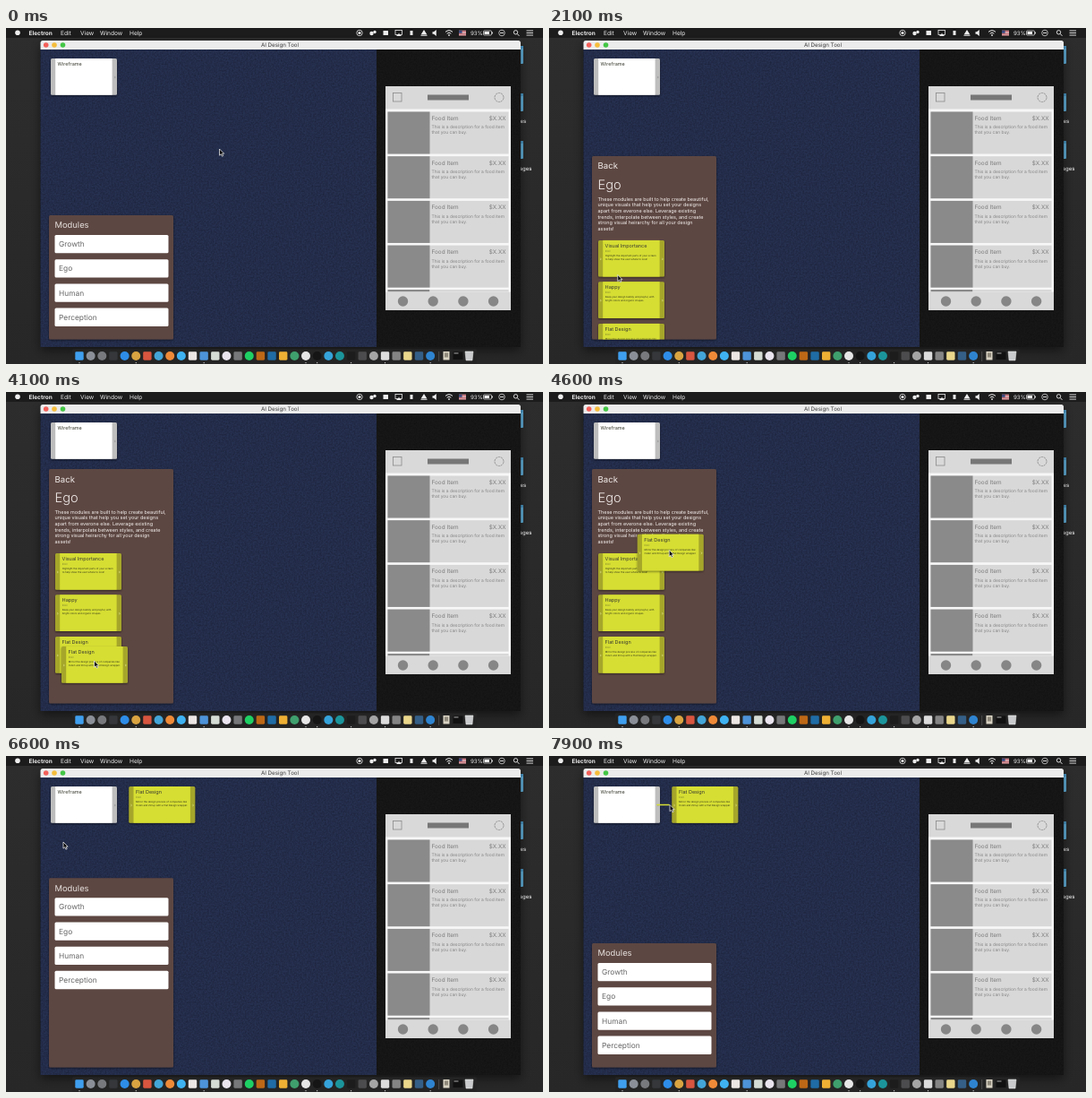
These frames come from a looping animation (600 by 375 pixels, 8 s). An HTML page:

```html
<!DOCTYPE html>
<html lang="en">
<head>
<meta charset="utf-8">
<title>AI Design Tool</title>
<style>
html, body { margin: 0; width: 100%; height: 100%; overflow: hidden; background: #2b2b2b; }
svg { display: block; width: 100vw; height: 100vh; }
text { font-family: Inter, Roboto, sans-serif; white-space: pre; text-rendering: geometricPrecision; }
</style>
</head>
<body>
<svg id="stage" viewBox="0 0 600 375"></svg>
<script>
const LOOP = 8000, STEP = 100, BOTTOM = 347.5;
const stage = document.getElementById('stage');

// Markup helpers
const rect = (x, y, w, h, fill, more = '') =>
  `<rect x="${x}" y="${y}" width="${w}" height="${h}" fill="${fill}" ${more}/>`;
const dot = (x, y, r, fill, more = '') =>
  `<circle cx="${x}" cy="${y}" r="${r}" fill="${fill}" ${more}/>`;
const path = (d, stroke, width = 1, fill = 'none') =>
  `<path d="${d}" fill="${fill}" stroke="${stroke}" stroke-width="${width}"/>`;
const solid = (d, fill) => path(d, 'none', 0, fill);
const label = (x, y, size, fill, str, more = '') =>
  `<text x="${x}" y="${y}" font-size="${size}" fill="${fill}" ${more}>${str}</text>`;
const lines = (x, y, gap, size, fill, rows) =>
  rows.map((row, i) => label(x, y + i * gap, size, fill, row)).join('');
const group = (id, body) => `<g id="${id}">${body}</g>`;
const at = (x, y, body) => `<g transform="translate(${x} ${y})">${body}</g>`;

const defs = `<defs>
  <linearGradient id="desk" x2="0" y2="1">
    <stop stop-color="#2d2d2d"/><stop offset="1" stop-color="#272727"/>
  </linearGradient>
  <filter id="grain" x="0" y="0" width="1" height="1">
    <feTurbulence type="fractalNoise" baseFrequency=".55" numOctaves="2" seed="4"/>
    <feColorMatrix values="0 0 0 0 0  0 0 0 0 0  0 0 0 0 0  .45 0 0 0 -.15"/>
  </filter>
  <filter id="shade" x="-20%" y="-20%" width="140%" height="150%">
    <feDropShadow dx="0" dy="1" stdDeviation="1" flood-opacity=".5"/>
  </filter>
  <filter id="deepShade" x="-10%" y="-10%" width="120%" height="120%">
    <feDropShadow dx="0" dy="4" stdDeviation="6" flood-opacity=".5"/>
  </filter>
  <clipPath id="panelClip"><rect id="clipBox" x="48" width="139" rx="1.5"/></clipPath>
</defs>`;

function menuBar() {
  const names = [[61, 'Edit'], [83, 'View'], [105, 'Window'], [138, 'Help']];
  const white = '#eee';
  return rect(0, 0, 600, 11, '#1c1c1c') + dot(13, 5.3, 2.8, white) +
    label(25.5, 7.8, 6.5, white, 'Electron', 'font-weight="700"') +
    names.map(([x, s]) => label(x, 7.8, 6.6, white, s)).join('') +
    dot(395, 5.5, 3.2, 'none', `stroke="${white}" stroke-width=".8"`) + dot(395, 5.5, 1.6, white) +
    dot(408.5, 6, 2.2, white) + dot(412, 4.5, 1.7, white) +
    rect(421.5, 3, 5.5, 5, white) +
    rect(435, 2.5, 7.5, 5, 'none', `stroke="${white}" stroke-width=".8"`) +
    solid('M436 9 L439 6 L442 9Z', white) +
    rect(451.5, 3, 3, 5, white) +
    solid('M467 2 L463.5 7.5 H470.5Z M463.5 8.2 H470.5V9H463.5Z', white) +
    solid('M476.5 4.3 H478 L480.8 2 V9 L478 6.7 H476.5Z', white) +
    path('M491 4.4 Q495 1 499 4.4 M492.7 6.2 Q495 4.2 497.3 6.2', white, 1) + dot(495, 8, .9, white) +
    rect(506, 2.8, 8, 5.6, '#e9e5e5') +
    [2.8, 4.4, 6, 7.6].map(y => rect(506, y, 8, .8, '#b9414c')).join('') + rect(506, 2.8, 3.6, 3, '#39477c') +
    label(519, 7.8, 6.2, white, '93%') +
    rect(533.5, 3, 9, 5, 'none', `rx="1" stroke="${white}" stroke-width=".7"`) + rect(534.5, 4, 5.5, 3, white) +
    rect(543, 4.6, .9, 1.8, white) +
    dot(554, 5.5, 3.3, 'none', `stroke="${white}" stroke-width=".7"`) +
    path('M552 5.5 H556.2', white, .9) +
    dot(569.5, 4.8, 2.2, 'none', `stroke="${white}" stroke-width=".9"`) + path('M571.2 6.5 L573.4 8.8', white, 1) +
    path('M581.5 3 H589 M581.5 5.5 H589 M581.5 8 H589', white, .9);
}

function desktop() {
  return rect(0, 0, 600, 375, 'url(#desk)') +
    [20, 73, 126].map(y => rect(566, y, 12, 20, '#62b1dc', 'rx="1"') + rect(566, y, 12, 3, '#4a97c4', 'rx="1"')).join('') +
    label(574.5, 106, 6, '#f2f2f2', 'es', 'font-weight="500"') +
    label(573.5, 158.5, 6, '#f2f2f2', 'ages', 'font-weight="500"');
}

function dock() {
  // Lower case marks a disc, upper case a square
  const icons = ('S3f9fee c8b9098 c77797d S35373a c2e8de8 cd9a441 Sd8553f c43a5d8 cef8a38 c3fb2f2 Sece6e4 S4d93d8 ' +
    'Sd5dcd5 ce9e4ee S77787a c1ed064 Sbd6816 S1f6ca6 Seeb034 c3f9f6d ce6e6e6 c151515 c35a3da c1b959b S1c1c1c S4c4c4e ' +
    'ca5a5a5 Sdcdcdc S858585 Sead78c S355f86 c2f84d0').split(' ');
  const running = [0, 5, 11, 20, 21, 24, 27, 31];
  let out = rect(74, 358.5, 452, 17, '#242424', 'rx="1.5"');
  icons.forEach((icon, i) => {
    const x = 82 + i * 12.65, fill = '#' + icon.slice(1);
    out += icon[0] === 'c' ? dot(x, 366, 5, fill) : rect(x - 4.7, 361.3, 9.4, 9.4, fill, 'rx="1.4"');
    if (running.includes(i)) out += dot(x, 373.7, .6, '#ddd');
  });
  return out + rect(483.5, 361, .6, 11, '#666') +
    rect(488.5, 361, 7, 9.5, '#d9d3c4') + rect(490, 362.5, 4, 5, '#8f8a7c') +
    rect(499.5, 361.5, 11, 8.5, '#111') + rect(500.5, 362.5, 5, 1, '#aaa') +
    path('M513 361 H522 L521 371 H514Z', '#f0f0f0', .5, '#c9cbcc');
}

function phone() {
  const gray = '#8a8a8a', pale = '#d8d8d8';
  let out = rect(424, 65, 140, 250, '#f7f7f7');
  for (let i = 0; i < 4; i++) {
    const y = 93.5 + i * 49.7;
    out += rect(426.5, y, 135, 47, pale) + rect(426.5, y, 47, 47, gray) +
      label(475.5, y + 9.3, 6.4, '#7b7b7b', 'Food Item') +
      label(558.5, y + 9.3, 6.3, '#7b7b7b', '$X.XX', 'text-anchor="end"') +
      lines(475.5, y + 18.9, 6, 4.9, '#858585', ['This is a description for a food item', 'that you can buy.']);
  }
  return out + rect(426.5, 292, 47, 2.5, gray) + rect(473.5, 292, 88, 2.5, pale) +
    rect(424, 65, 140, 25.5, '#d9d9d9') + rect(424, 294.5, 140, 20.5, '#d9d9d9') +
    rect(432.5, 72.5, 9.5, 9.5, 'none', 'stroke="#8a8a8a" stroke-width=".8"') +
    rect(471, 74.5, 46, 6, '#777') +
    dot(551, 77.5, 5, 'none', 'stroke="#8a8a8a" stroke-width=".8" stroke-dasharray="2.5 .6"') +
    [443.5, 477.2, 510.9, 544.6].map(x => dot(x, 305, 5.7, '#868686')).join('');
}

function windowFrame() {
  return rect(38.5, 14, 536.5, 342, '#111', 'rx="2.5" filter="url(#deepShade)"') +
    rect(38.5, 24, 375.5, 332, '#263050') + rect(414, 24, 161, 332, '#171717') +
    rect(38.5, 24, 536.5, 332, '#000', 'filter="url(#grain)"') +
    solid('M38.5 24 V16.5 Q38.5 14 41 14 H572.5 Q575 14 575 16.5 V24Z', '#ececec') +
    [[44.7, '#f4605a'], [54, '#f6bd3b'], [63.5, '#43c645']].map(([x, c]) => dot(x, 19, 2.8, c)).join('') +
    label(306, 21.2, 6.2, '#3c3c3c', 'AI Design Tool', 'text-anchor="middle"') + phone();
}

function card(title, rows, face = '#d6de33', edge = '#a5a62c') {
  const tick = face === '#fff' ? '#888' : '#e2e58a';
  return rect(0, 0, 74, 40.7, edge, 'rx="1.5" filter="url(#shade)"') + rect(5.2, 0, 63.4, 40.7, face) +
    path('M71 20 L72.4 21 L71 22', tick, .6) +
    (rows ? path('M2 20 L3.4 21 L2 22', tick, .6) + label(7.8, 13.2, 2.8, '#7c8030', 'EGO') : '') +
    label(7.6, 7.8, 5.5, '#3a3a30', title) +
    (rows ? lines(7.8, 18, 4, 2.75, '#33351a', rows) : '');
}

const flat = card('Flat Design', ['Mirror the design process of companies like', 'Ovlen and Zirrup with a Flat Design wrapper.']);

const modules = label(6.5, 14.3, 9.4, '#e6e0de', 'Modules') +
  ['Growth', 'Ego', 'Human', 'Perception'].map((name, i) => {
    const y = 22 + i * 27.2;
    return rect(6.5, y, 127, 20.3, '#fff', 'rx="1.5"') + label(11, y + 13.2, 8.4, '#666', name);
  }).join('');

const detail = label(6.5, 14.6, 9.6, '#f0ebe9', 'Back') +
  label(6.5, 36.7, 14.6, '#f0ebe9', 'Ego', 'font-weight="300"') +
  lines(6.5, 49.8, 6.65, 5.45, '#f6f2f0', [
    'These modules are built to help create beautiful,', 'unique visuals that help you set your designs',
    'apart from everone else. Leverage existing', 'trends, interpolate between styles, and create',
    'strong visual heirarchy for all your design', 'assets!']);

const cards = at(7, 94, card('Visual Importance', ['Highlight the important parts of your screen', 'to help show the user where to look!'])) +
  at(7, 140.3, card('Happy', ['Keep your design bubbly and playful, with', 'bright colors and organic shapes.'])) +
  at(7, 187, flat);

stage.innerHTML = defs + desktop() + menuBar() + windowFrame() + dock() +
  at(50, 34, card('Wireframe', null, '#fff', '#bdbdbd')) +
  rect(48, 0, 139, 0, '#5d4642', 'id="panel" rx="1.5" filter="url(#shade)"') +
  `<g clip-path="url(#panelClip)">${group('content', group('modules', modules) + group('detail', detail) + group('cards', cards))}</g>` +
  group('dragged', flat) +
  '<path id="wire" stroke="#d6de33" stroke-width="1.6" stroke-linecap="round"/>' +
  group('arrow', path('M0 0 V7.2 L1.7 5.7 L2.9 8.2 L4.2 7.6 L3 5.2 H5.2Z', '#fff', .7, '#0a0a0a'));

// Motion tables: [time, x, y]
const pointerPath = [
  [0, 238.5, 135], [200, 236, 139], [1100, 73, 269], [1900, 73, 270], [2700, 97, 305],
  [3700, 97, 305], [4100, 98.5, 300], [5100, 170, 53], [5400, 171.5, 52.5], [5600, 171.5, 53],
  [6200, 64, 96], [6700, 64, 96], [7350, 120, 55], [7550, 121, 55], [7900, 135, 54.5]
];
const dragPath = [[3800, 55, 273], [4100, 62, 284], [5100, 135.5, 33.5], [5400, 137, 33], [5500, 137.3, 34]];
const panelPath = [[0, 209], [1850, 209], [2650, 86], [6400, 86], [7200, 209]];

const smooth = u => u * u * (3 - 2 * u);

// Cubic bezier (.25, .1, .25, 1)
function ease(u) {
  let lo = 0, hi = 1;
  const curve = (s, a, b) => 3 * s * (1 - s) ** 2 * a + 3 * s * s * (1 - s) * b + s ** 3;
  for (let i = 0; i < 20; i++) {
    const mid = (lo + hi) / 2;
    if (curve(mid, .25, .25) < u) lo = mid; else hi = mid;
  }
  return curve(lo, .1, 1);
}

function sample(table, t, timing) {
  const next = table.findIndex(row => row[0] > t);
  if (next < 0) return table[table.length - 1].slice(1);
  if (next === 0) return table[0].slice(1);
  const a = table[next - 1], b = table[next];
  const u = timing((t - a[0]) / (b[0] - a[0]));
  return a.slice(1).map((v, i) => v + (b[i + 1] - v) * u);
}

const el = id => document.getElementById(id);
const place = (id, x, y) => el(id).setAttribute('transform', `translate(${x} ${y})`);
const show = (id, on) => el(id).setAttribute('display', on ? 'inline' : 'none');

function draw(t) {
  const [top] = sample(panelPath, t, ease);
  const [px, py] = sample(pointerPath, t, smooth);
  const inDetail = t >= 1400 && t < 6400;
  for (const id of ['panel', 'clipBox']) {
    el(id).setAttribute('y', top);
    el(id).setAttribute('height', BOTTOM - top);
  }
  place('content', 48, top);
  show('modules', !inDetail);
  show('detail', inDetail);
  show('cards', inDetail && t > 1850);

  show('dragged', t >= 3800);
  place('dragged', ...sample(dragPath, t, smooth));

  show('wire', t >= 7500);
  el('wire').setAttribute('d', `M121 54.5 L${px - 1} 54.5`);

  // The pointer is hidden while it rests over the paragraph
  show('arrow', t < 1400 || t >= 2000);
  place('arrow', px, py);
}

const start = performance.now();
function tick() {
  const t = (performance.now() - start) % LOOP;
  draw(Math.floor(t / STEP) * STEP);
  requestAnimationFrame(tick);
}
draw(0);
requestAnimationFrame(tick);
</script>
</body>
</html>
```
